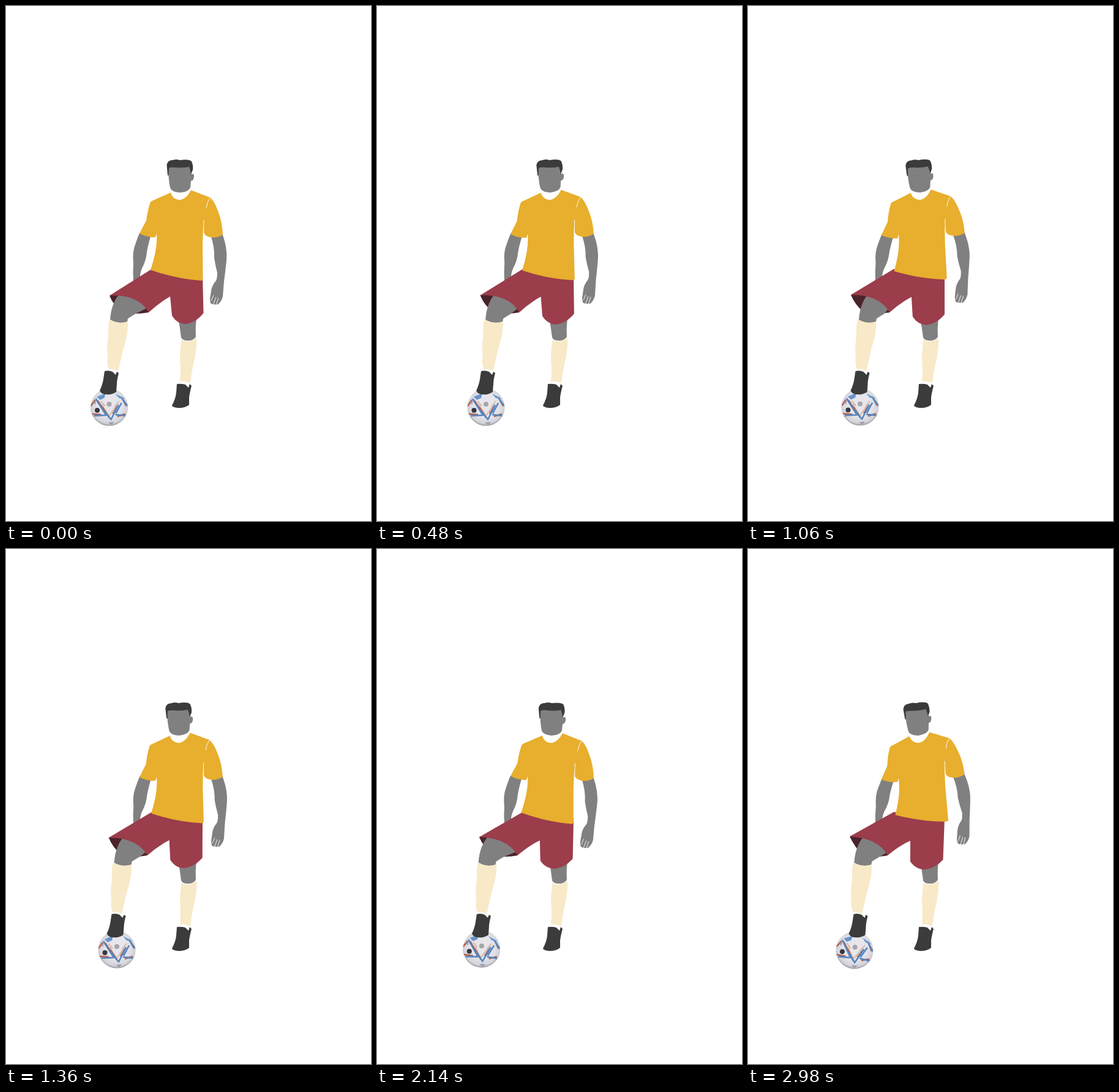
An HTML page for the animation above (3000 ms loop, 596x842 px).

```html
<!DOCTYPE html>
<html lang="en">
<head>
<meta charset="utf-8">
<title>Footballer</title>
<style>
html, body { margin: 0; width: 100%; height: 100%; overflow: hidden; background: #fff; }
svg { display: block; width: 100vw; height: 100vh; }
.skin { fill: #808080; }
.dark { fill: #3b3b3b; }
.gold { fill: #e8ae2d; }
.sock { fill: #f8e9c8; }
.shorts { fill: #9b3d4b; }
.lining { fill: #4a232a; }
.gap { fill: none; stroke: #fff; stroke-width: .9; }
.stripe { fill: none; stroke-linejoin: round; }
</style>
</head>
<body>
<svg viewBox="0 0 596 842">
  <defs>
    <radialGradient id="shade" cx="50%" cy="45%" r="55%">
      <stop offset=".55" stop-color="#e6e6ec"/>
      <stop offset=".88" stop-color="#d3d3d9"/>
      <stop offset="1" stop-color="#98989e"/>
    </radialGradient>
    <clipPath id="round"><circle r="30.3"/></clipPath>
  </defs>

  <g id="backArm">
    <path class="skin" d="M218 371L237 374Q232 390 230 402Q229 416 222 429Q218 438 219 450H208Q207 435 208 420Q206 403 211 390Q214 381 218 371Z"/>
  </g>

  <!-- standing leg -->
  <path class="skin" d="M281 510L311 512Q309 525 310 541Q305 548 296 547Q288 547 286 542Q284 525 281 510Z"/>
  <path class="sock" d="M286 546Q298 552 311 543Q312 556 308 577Q303 597 302 610L300 617Q292 612 284 614Q285 600 285 590Q283 570 285 560Z"/>
  <path class="dark" d="M279 618Q287 617 293 619L298 624L300 618L303 621Q300 632 299 640L299 652Q292 658 280 657Q272 656 271 653Q277 642 278 632Z"/>

  <g id="ball">
    <circle r="30.5" fill="url(#shade)"/>
    <g clip-path="url(#round)">
      <g class="stripe" stroke="#d9b7a4" stroke-width="2">
        <path d="M-20 -9L-5 10M-12 -4L0 14L13 -5M-14 -10L-7 -2M16 -10L9 -1"/>
      </g>
      <g class="stripe" stroke="#b4604f" stroke-width="2.6">
        <path d="M-30 -2L-23 -12M-19 -11L-8 6M-28 11L-13 12M-11 0L0 17M13 -1L6 11M22 -13L28 -2M13 15L26 11"/>
      </g>
      <g class="stripe" stroke="#5585c0" stroke-width="2.6">
        <path d="M-22 -14L-5 13L-25 14M-9 5L3 20L15 -4M19 -17L30 -2M10 12L27 14M11 10L20 -7"/>
      </g>
      <path d="M-20 -17L-6 -23L-8 -15L-15 -12ZM10 -22L26 -14L16 -15Z" fill="#6795cc"/>
      <path d="M-2 25L8 24L4 29ZM-26 -8L-21 -12L-23 -4Z" fill="#9a9eac"/>
    </g>
    <circle cx="-19.5" cy="5" r="4" fill="#36383f"/>
    <circle cx="0" cy="-5" r="4" fill="#a9a6aa"/>
  </g>

  <path id="lining" class="lining"/>
  <path id="thigh" class="skin"/>
  <g id="shin">
    <path class="sock" d="M169 512Q183 521 199 516Q200 530 195 548Q190 565 187 580L183 597Q176 592 169 594Q164 588 166 574Q164 560 167 540Q166 524 169 512Z"/>
  </g>
  <g id="shoe">
    <path class="dark" d="M161 597Q168 595 174 598L179 603L181 598L184 600Q181 612 181 618L180 631Q173 636 164 635Q156 635 153 629Q158 618 159 610Z"/>
  </g>
  <path id="shorts" class="shorts"/>

  <g id="torso">
    <path class="skin" d="M334 374Q341 395 340 412Q342 425 345 436Q345 445 343 449Q336 457 335 466L333 479L334 486L338 488L346 488Q352 483 354 475L356 450Q358 435 359 425Q361 410 360 402Q359 388 353 372Z"/>
    <path class="gap" d="M339 473L335 482M343 476L338 489M347 477L343 489"/>
    <path class="gold" d="M269 305C271 313 277 317 284 317C292 316 298 309 302 301L333 313Q340 318 346 335Q353 352 354 374Q344 380 334 378Q326 377 323 371L322 362L321 390L321.500 447Q321 449 318 449Q277 446 236 431.500Q248 396 246 372L244 378Q232 379 218 372Q224 360 229 351Q231 335 235 323Q236 319 240 318Z"/>
    <path class="gap" d="M333 314Q328 321 327 330M323 350L322.500 371"/>
    <path class="skin" d="M265 263L302 262L303 275Q307 273 307 278Q307 285 302 286L301 297Q298 304 284 305Q270 304 268 297Q265 283 265 263Z"/>
    <path class="dark" d="M264 277L262.500 260Q264 252 272 252Q278 250 284 252Q299 250 303 254Q306 260 305 268L302 275Q301 268 299 263Q290 265 278 264Q268 263 266 265L265.500 277Z"/>
  </g>
</svg>
<script>
const LOOP = 3000, STEP = 20;
const times = [0, 480, 760, 1060, 1360, 1840, 2160, 2460, 2980];
const tracks = {
  lean: [0, -1.1, -2.2, -2.6, -1.1, 1, 0.6, -1.1, -4.5],
  leg: [0, 6.5, 10.5, 10, 6, -3, -4, -2, 3],
  shoe: [0, 9, 14, 14.5, 11.5, 2, 2, 5, 11.5],
  ballX: [168.5, 178, 182, 183, 181, 174, 170.5, 172, 174],
  ballY: [656, 656, 656, 655.5, 655, 653, 654, 655, 656],
  spin: [0, 0, -2, 0, 0, 0, 4, 8, 8]
};
const part = id => document.getElementById(id);
const place = (id, value) => part(id).setAttribute("transform", value);
const shape = (id, value) => part(id).setAttribute("d", value);

// Smooth curve through the key poses.
function sample(values, t) {
  const last = times.length - 1;
  let i = 0;
  while (i < last - 1 && t > times[i + 1]) i++;
  const slope = k => {
    const a = Math.max(k - 1, 0), b = Math.min(k + 1, last);
    return (values[b] - values[a]) / (times[b] - times[a]);
  };
  const span = times[i + 1] - times[i], u = (t - times[i]) / span, v = 1 - u;
  return values[i] * (1 + 2 * u) * v * v + values[i + 1] * u * u * (3 - 2 * u)
    + span * u * v * (slope(i) * v - slope(i + 1) * u);
}

function draw(t) {
  const pose = {};
  for (const name in tracks) pose[name] = sample(tracks[name], t);
  const { lean, leg, shoe, ballX, ballY, spin } = pose;
  const turn = t / LOOP;
  const pt = (x, y, dx, dy) => `${x + dx * turn} ${y + dy * turn} `;
  const knee = (x, y) => `${x + leg * 1.1} ${y} `;

  place("torso", `rotate(${lean} 280 375)`);
  place("backArm", `rotate(${-0.4 * lean} 213 448)`);
  place("shin", `translate(${leg})`);
  place("shoe", `translate(${shoe})`);
  place("ball", `translate(${ballX} ${ballY}) rotate(${spin})`);

  const tip = pt(169, 473.5, -3, -3.5), hem = pt(233, 501, -5, 0);
  const hemCurve = pt(216, 471, -3, 2);
  // The lining reaches above the hem so no background shows between them.
  shape("lining", `M${tip}Q${pt(175, 489, -1, -2)}${pt(188, 499, -2, 0)}Q205 506 ${hem}L222 470L200 462Z`);
  shape("thigh", `M${knee(186, 470)}Q${knee(172, 485)}${knee(170, 513)}Q${knee(184, 521)}${knee(198, 516)}`
    + `L${knee(199, 511)}Q${knee(205, 507)}${knee(212, 503)}L230 494L222 470Z`);
  shape("shorts", `M238 430L${tip}Q${hemCurve}${hem}`
    + `Q${pt(250, 485, -3, 0)}${pt(268, 475, -3, 2)}L${pt(271, 506, -6, 5)}`
    + `Q${pt(278, 519, -4, 5)}${pt(293, 520, -4, 4)}Q${pt(310, 518, -4, 4)}${pt(322.5, 502, -4, 6)}L321 440Z`);
}

function tick(now) {
  draw(Math.floor(now % LOOP / STEP) * STEP);
  requestAnimationFrame(tick);
}
draw(0);
requestAnimationFrame(tick);
</script>
</body>
</html>
```
